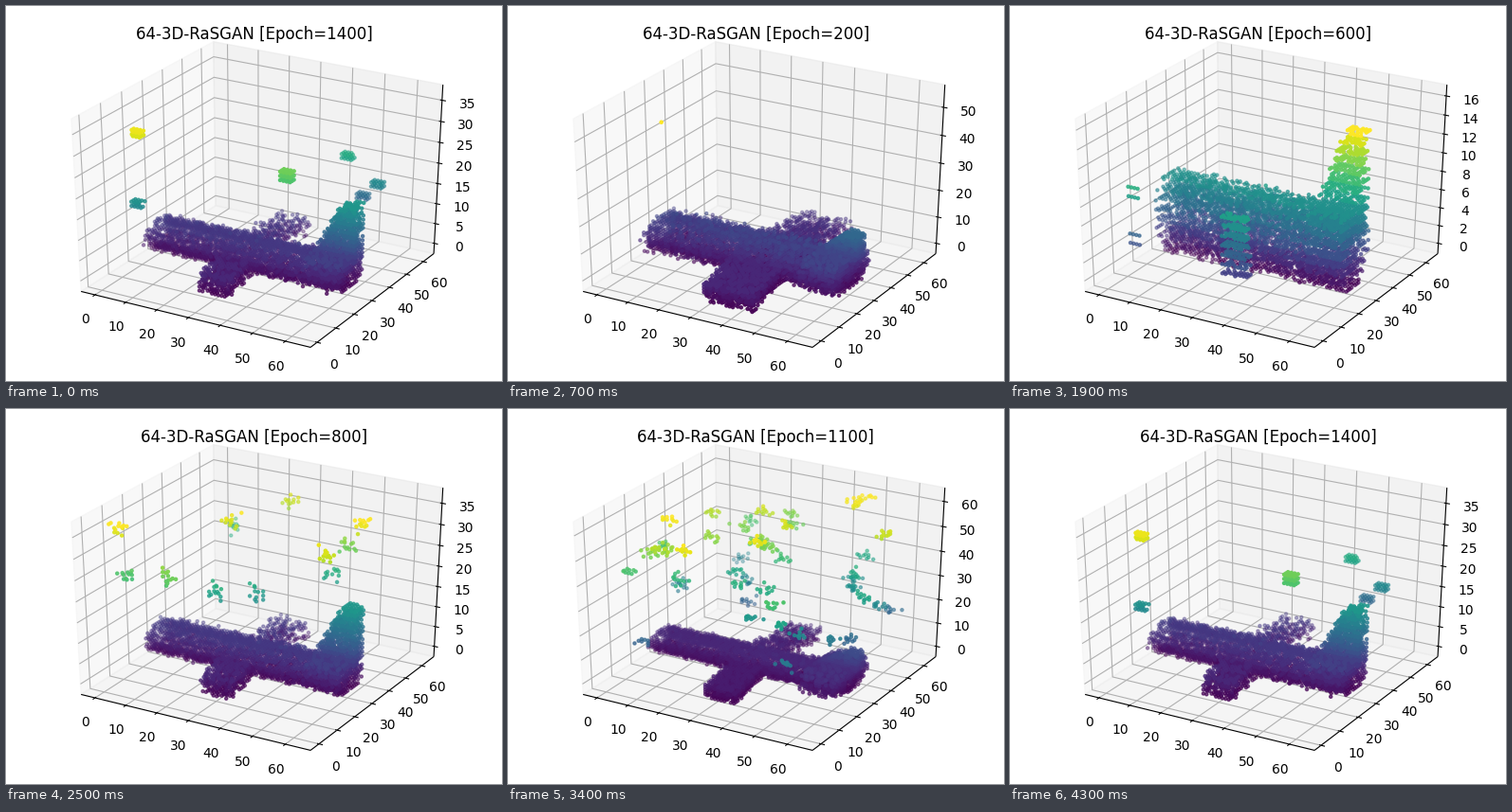
Recreate the animation shown at these times as a matplotlib script. Size 523x396 px, loop 5.3 s.

```python
import numpy as np
import matplotlib.pyplot as plt
from matplotlib.animation import FuncAnimation
from matplotlib.collections import LineCollection

plt.rcParams["font.family"] = "DejaVu Sans"

W, H, DPI = 523, 396, 100
LEFT, BASE, AX_W, AX_H = 13.4, 383.1, 496, 369.6
VIEW_LO, VIEW_SPAN, DIST = -0.095, 0.185, 10
LOW, HIGH = -1 / 48, 1 + 1 / 48
MID = 29  # y of the plane's long axis

# Camera basis for azimuth -60 and elevation 30 degrees
az, el = np.radians([-60, 30])
TOWARD = np.array([np.cos(az) * np.cos(el), np.sin(az) * np.cos(el), np.sin(el)])
RIGHT = np.array([-np.sin(az), np.cos(az), 0])
UP = np.cross(TOWARD, RIGHT)


def top_level(epoch):
    """Highest voxel level of an epoch."""
    if epoch in (700, 800, 1400):
        return 36
    return {200: 54, 300: 48, 400: 42, 500: 42, 600: 16}.get(epoch, 61)


def project(unit):
    """Unit cube coordinates to stage pixels and distance."""
    q = np.asarray(unit, float) - 0.5
    w = DIST - q @ TOWARD
    px = LEFT + AX_W * (q @ RIGHT / w - VIEW_LO) / VIEW_SPAN
    py = BASE - AX_H * (q @ UP / w - VIEW_LO) / VIEW_SPAN
    return np.stack([px, py], -1), w


class Cloud:
    """Collects the voxels of one epoch."""

    def __init__(self, epoch):
        self.rng = np.random.default_rng(epoch)
        self.top = top_level(epoch)
        inset = int(epoch == 1400)
        lo = np.array([0, inset, 0])
        hi = np.array([63, 63 - inset, self.top])
        pad = 0.05 * (hi - lo)
        self.lo, self.hi = lo - pad, hi + pad
        self.parts = []

    def add(self, x, y, z, keep=1.0):
        """Add points; keep is a chance or a mask."""
        pts = np.stack([np.ravel(a) for a in (x, y, z)], -1)
        self.parts.append(pts[self.rng.random(len(pts)) < np.ravel(keep)])

    def voxels(self):
        pts = np.rint(np.concatenate(self.parts)).astype(int)
        return np.unique(np.clip(pts, 0, [63, 62, self.top]), axis=0)

    def locate(self, px, py, z):
        """Voxel at level z that is seen at a stage position."""
        X = (px - LEFT) / AX_W * VIEW_SPAN + VIEW_LO
        Y = (BASE - py) / AX_H * VIEW_SPAN + VIEW_LO
        rows = np.array([RIGHT + X * TOWARD, UP + Y * TOWARD])
        qz = (z - self.lo[2]) / (self.hi[2] - self.lo[2]) - 0.5
        qxy = np.linalg.solve(rows[:, :2], DIST * np.array([X, Y]) - rows[:, 2] * qz)
        return (qxy + 0.5) * (self.hi - self.lo)[:2] + self.lo[:2]

    def block(self, xs, ys, zs, keep=1.0):
        self.add(*grid(xs, ys, zs), keep)

    def spot(self, px, py, z, size=(4, 3, 2), keep=0.9):
        x, y = np.rint(self.locate(px, py, z)).astype(int)
        spans = [(c - n // 2, c - n // 2 + n - 1) for c, n in zip((x, y, z), size)]
        self.block(*spans, keep)

    def blob(self, px, py, z, n, spread):
        x, y = self.locate(px, py, z)
        g = self.rng.normal(0, spread, (n, 3))
        self.add(x + g[:, 0], y + g[:, 1], z + 0.6 * g[:, 2])

    def clumps(self, count, floor=18, n=14, spread=0.9):
        """Loose knots of voxels at random places above the plane."""
        for _ in range(count):
            middle = self.rng.uniform([1, 1, floor], [62, 62, self.top])
            self.add(*self.rng.normal(middle, [1.4 * spread, spread, spread], (n, 3)).T)

    def fuselage(self, top, half, fuzz=0.08, inner=0.6, start=0, keep=0.8):
        x, y, z = grid((start, 61), (MID - 14, MID + 14), (0, top + 4))
        r = np.hypot((y - MID) / half, (z - top / 2) / (top / 2 + 0.6))
        edge = 1 + fuzz * self.rng.normal(size=r.shape)
        self.add(x, y, z, keep * ((r > inner) & (r < edge)))

    def wings(self, xs, span, top, keep=0.5):
        x, y, z = grid(xs, (MID - span, MID + span), (0, top))
        out = abs(y - MID)
        far = np.where(y > MID, 0.5, 1)
        self.add(x + 0.15 * (out - 15), y, z + (y > MID) * 2, keep * far * (out > 5))

    def fin(self, base, top, length=12, keep=0.7):
        for z in range(base, top + 1):
            n = length * (1 - 0.7 * (z - base) / (top - base))
            self.block((int(62 - n), 62), (MID, MID + 5), (z, z), keep)

    def tailplane(self, reach, top, keep=0.35):
        self.block((51, 61), (MID - reach, MID + reach - 2), (2, top), keep)


def grid(*spans):
    return np.meshgrid(*[np.arange(a, b + 1) for a, b in spans], indexing="ij")


def fill_noise(c, epoch):
    c.add(*c.rng.uniform(0, 62, (3, 6000)))


def fill_rough(c, epoch):
    c.fuselage(10, 8.5, 0.25 - epoch / 2500, 0.65)
    c.wings((29, 44), 28, 6)
    c.tailplane(11, 11)
    c.fin(10, 18)
    if epoch == 200:
        c.spot(163, 123, 54, (1, 1, 1), 1)
    else:
        c.clumps(30)


def fill_lumpy(c, epoch):
    c.fuselage(8, 11, 0.3)
    c.tailplane(10, 9)
    c.blob(225, 268, 9, 350, 4.5)
    c.blob(220, 290, 3, 250, 4)
    c.blob(350, 258, 13, 150, 3)
    c.blob(198, 200, 24, 350, 4.5)
    # Two rows of lumps float above the body
    for i in range(4):
        c.blob(228 + 54 * i, 184 + 10 * i, 16 - i, 240, 3.8)
        c.blob(160 + 60 * i, 240 - 8 * i, 9 + 2 * i, 200, 4.5)
        c.blob(250 + 32 * i, 208 + 5 * i, 14, 260, 4)
    c.blob(258, 120, 40, 40, 2)
    c.blob(292, 154, 21, 45, 2)
    for px, py in ((203, 107), (323, 128), (372, 136)):
        c.blob(px, py, 40, 11, 1.8)


def fill_rows(c, epoch):
    c.fuselage(8, 8.5, 0.05, 0.35, 3, 0.6)
    c.tailplane(8, 8)
    c.fin(6, 16, 14)
    c.block((35, 42), (3, 6), (3, 9), 0.75)
    for z in (4, 5, 9, 10):
        c.block((6, 9), (3, 3), (z, z))
    if epoch == 500:
        c.wings((31, 40), 24, 4)
        c.clumps(20)


def fill_clean(c, epoch):
    c.fuselage(6, 7.5)
    c.wings((26, 35), 22, 4)
    c.tailplane(8, 7)
    c.fin(6, 19)
    if epoch < 1400:
        c.clumps(12)
        return
    c.spot(139, 133, 35)
    c.spot(140, 207, 18)
    c.spot(299, 180, 27, (4, 3, 3), 1)
    c.spot(361, 156, 22)
    c.spot(393, 187, 17)
    c.spot(379, 199, 13)


def fill_cluttered(c, epoch):
    """A tidy plane below clutter that thins out with the epochs."""
    age = (epoch - 900) / 100
    first = epoch == 900
    c.fuselage(7, 6.8, start=4 if first else 0)
    c.wings((34, 39) if first else (28, 37), 24, 5, 0.65)
    c.tailplane(11, 9)
    c.fin(8, 14)
    c.clumps(int(230 * 0.45 ** age), n=16 if first else 11)
    if first:
        for t in np.linspace(0, 1, 9):
            c.blob(325 + 82 * t, 212 - 55 * t ** 1.2, 40 + 8 * t, 28, 1.8)


# First epoch of each stage
STAGES = ((0, fill_noise), (100, fill_rough), (400, fill_lumpy), (500, fill_rows),
          (700, fill_clean), (900, fill_cluttered), (1400, fill_clean))

fig = plt.figure(figsize=(W / DPI, H / DPI), dpi=DPI, facecolor="white")
ax = fig.add_axes([0, 0, 1, 1])
ax.set_xlim(0, W)
ax.set_ylim(H, 0)
ax.axis("off")

# Back panes
BACK = np.array([LOW, HIGH, LOW])
for axis, grey in ((0, 0.95), (1, 0.90), (2, 0.925)):
    corners = np.tile(BACK, (4, 1))
    j, k = [n for n in range(3) if n != axis]
    corners[:, j] = [LOW, HIGH, HIGH, LOW]
    corners[:, k] = [LOW, LOW, HIGH, HIGH]
    ax.fill(*project(corners)[0].T, color=(grey,) * 3 + (0.5,), lw=1, zorder=1)

# Start of each axis line, axis its ticks follow, outward sign
EDGES = (((LOW, LOW, LOW), 1, -1), ((HIGH, LOW, LOW), 0, 1), ((HIGH, HIGH, LOW), 0, 1))
LABEL_GAP = 11.5 * 48 / (72 * (AX_W + AX_H) / DPI) / 12


def tick_values(axis, top):
    if axis < 2:
        return range(0, 61, 10)
    return range(0, top + 1, 2 if top < 20 else 5 if top < 40 else 10)


def build_axes(cloud):
    edges, mesh, ticks, texts = [], [], [], []
    for axis, (start, tick_dir, out) in enumerate(EDGES):
        start = np.array(start)
        end = start.copy()
        end[axis] = HIGH
        edges.append(project([start, end])[0])
        for value in tick_values(axis, cloud.top):
            u = (value - cloud.lo[axis]) / (cloud.hi[axis] - cloud.lo[axis])
            bend = BACK.copy()
            bend[axis] = u
            path = [bend.copy(), bend, bend.copy()]
            for n, other in zip((0, 2), [a for a in range(3) if a != axis]):
                path[n][other] = LOW + HIGH - BACK[other]
            mesh.append(project(path)[0])

            pos = start.copy()
            pos[axis] = u
            inner, outer = pos.copy(), pos.copy()
            inner[tick_dir] -= out * 0.1 / 12
            outer[tick_dir] += out * 0.2 / 12
            ticks.append(project([inner, outer])[0])

            shift = np.sign(pos - 0.5) * LABEL_GAP
            shift[axis] = 0
            x, y = project(pos + shift)[0]
            texts.append(ax.text(x, y, str(value), size=10, ha="center", va="top"))
    lines = [ax.add_collection(LineCollection(segs, colors=color, linewidths=0.8, zorder=z))
             for segs, color, z in ((edges, "k", 2), (mesh, "#b0b0b0", 2.1), (ticks, "k", 2.2))]
    return lines + texts


def build_points(cloud):
    vox = cloud.voxels()
    xy, dist = project((vox - cloud.lo) / (cloud.hi - cloud.lo))
    depth = -1 / dist
    colors = plt.cm.viridis(vox[:, 2] / cloud.top)
    colors[:, 3] = 1 - 0.7 * (depth - depth.min()) / np.ptp(depth)
    order = np.argsort(-dist)
    return ax.scatter(*xy[order].T, s=20, marker=".", c=colors[order], zorder=3)


def build_scene(epoch):
    cloud = Cloud(epoch)
    fill = [f for first, f in STAGES if first <= epoch][-1]
    fill(cloud, epoch)
    title = ax.text(LEFT + AX_W / 2, BASE - 0.92 * AX_H - 8.33,
                    f"64-3D-RaSGAN [Epoch={epoch}]", size=12, ha="center",
                    va="baseline", zorder=5)
    return build_axes(cloud) + [build_points(cloud), title]


SCENES = {epoch: build_scene(epoch) for epoch in range(0, 1401, 100)}


def epoch_at(frame):
    if frame == 0:
        return 1400
    return min((frame - 1) // 3, 14) * 100


def update(frame):
    now = epoch_at(frame)
    for epoch, artists in SCENES.items():
        for artist in artists:
            artist.set_visible(epoch == now)
    return []


anim = FuncAnimation(fig, update, frames=53, interval=100, repeat=True, repeat_delay=0)
plt.show()
```
